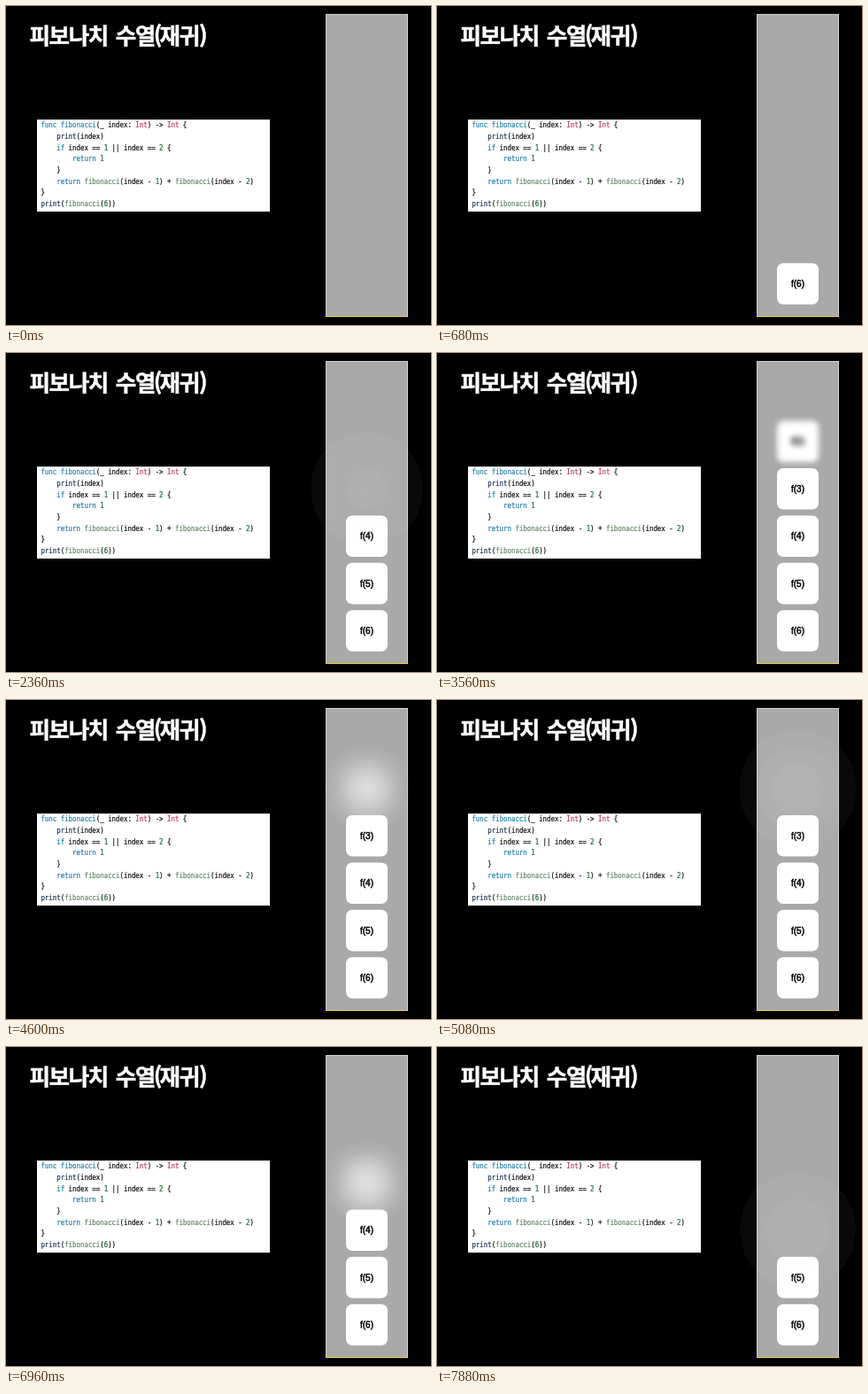
Write an HTML page that moves like this. It is 480 px wide and 360 px high and loops after 8000 ms.

```html
<!DOCTYPE html>
<html lang="ko">
<head>
<meta charset="utf-8">
<style>
  html, body { margin: 0; width: 100%; height: 100%; overflow: hidden; background: #000; }
  svg { display: block; }
  text { white-space: pre; }
  .title { font: bold 25.5px "Noto Sans CJK KR", "Noto Sans CJK", sans-serif; letter-spacing: -1.3px; word-spacing: 2.8px; fill: #fff; stroke: #fff; stroke-width: .5px; }
  .code { font: 7.41px "DejaVu Sans Mono", monospace; fill: #111; stroke: #111; stroke-width: .2px; }
  .block { font: 10px "Liberation Sans", Arial, sans-serif; text-anchor: middle; stroke: #000; stroke-width: .5px; }
</style>
</head>
<body>
<svg width="480" height="360" viewBox="0 0 480 360">
  <defs>
    <filter id="soft" filterUnits="userSpaceOnUse" x="0" y="-60" width="600" height="540" color-interpolation-filters="sRGB">
      <feGaussianBlur id="blur" stdDeviation="0"/>
      <feComponentTransfer><feFuncA id="bands" type="discrete"/></feComponentTransfer>
    </filter>
  </defs>
  <rect width="480" height="360"/>
  <text class="title" x="26.4" y="43.3">피보나치 수열<tspan dx="-1.2">(</tspan><tspan dx="-1.6">재귀</tspan>)</text>
  <rect x="35" y="128.2" width="263" height="103.8" fill="#fff"/>
  <g id="code" class="code"></g>
  <rect x="361.5" y="9.5" width="92" height="341" fill="#a9a9a9" stroke="#d0d0d0"/>
  <path d="M361 350.5H454" stroke="#e0cc3c"/>
  <g id="stack"></g>
</svg>
<script>
const $ = id => document.getElementById(id);

// Code listing
const source = `func fibonacci(_ index: Int) -> Int {
    print(index)
    if index == 1 || index == 2 {
        return 1
    }
    return fibonacci(index - 1) + fibonacci(index - 2)
}
print(fibonacci(6))`;
const colors = {
  'func fibonacci': '#2484a8', if: '#1f7da4', return: '#1f7da4',
  Int: '#c03a68', fibonacci: '#64886a', print: '#1c3450'
};
const paint = line => line.replace(/func fibonacci|\bif\b|return|Int|fibonacci|print|\d/g, word => {
  const color = colors[word] || '#206c38';
  return `<tspan fill="${color}" stroke="${color}">${word}</tspan>`;
});
$('code').innerHTML = source.split('\n').map((line, i) =>
  `<text transform="translate(39.4 ${137.4 + 12.68 * i}) scale(1 1.18)">${paint(line)}</text>`).join('');

// Faint glows fall into even steps of opacity
$('bands').setAttribute('tableValues', Array.from({ length: 26 }, (_, k) => k / 25).join(' '));

// Calls pushed on and popped off: argument, slot, push, first and last step, time of full sharpness
const events = [
  [6, 0, true, 360, 680, 665],
  [5, 1, true, 1080, 1360, 1345],
  [4, 2, true, 1680, 2040, 2025],
  [3, 3, true, 2360, 2720, 2683],
  [2, 4, true, 3040, 3360, 3345],
  [2, 4, false, 3560, 3960, 3539],
  [1, 4, true, 4440, 4720, 4705],
  [1, 4, false, 4920, 5360, 4826],
  [3, 3, false, 5600, 5920, 5570],
  [2, 3, true, 6480, 6720, 6705],
  [2, 3, false, 6920, 7280, 6860],
  [4, 2, false, 7600, 7880, 7580]
];
const pauses = [[1080, 1240], [2360, 2480], [4440, 4600], [5080, 5240]];
const LOOP = 8000, STEP = 40, RATE = 1.3 / 1000, SPREAD = 112, GONE = 0.54;

function block(n, slot, amount) {
  const y = 290.2 - 53.4 * slot;
  return `<g ${amount ? 'filter="url(#soft)"' : ''}><g opacity="${1 - amount}">
    <rect x="384" y="${y}" width="47" height="46.6" rx="7" fill="#fff"/>
    <text class="block" x="407.5" y="${y + 26.8}">f(${n})</text></g></g>`;
}

function draw(t) {
  t = Math.floor(t / STEP) * STEP;
  for (const [from, to] of pauses) if (t >= from && t < to) t = from;

  const slots = [];
  for (const event of events) if (t >= event[3]) slots[event[1]] = event;

  let markup = '';
  for (const [n, slot, push, , last, sharp] of slots.filter(Boolean)) {
    const away = push ? sharp - t : Math.min(t, last) - sharp;
    const amount = Math.max(0, away * RATE);
    if (amount > GONE) continue;
    if (amount) $('blur').setAttribute('stdDeviation', amount * SPREAD);
    markup += block(n, slot, amount);
  }
  if (markup !== draw.shown) $('stack').innerHTML = draw.shown = markup;
}

function tick() {
  draw(performance.now() % LOOP);
  requestAnimationFrame(tick);
}
tick();
</script>
</body>
</html>
```
